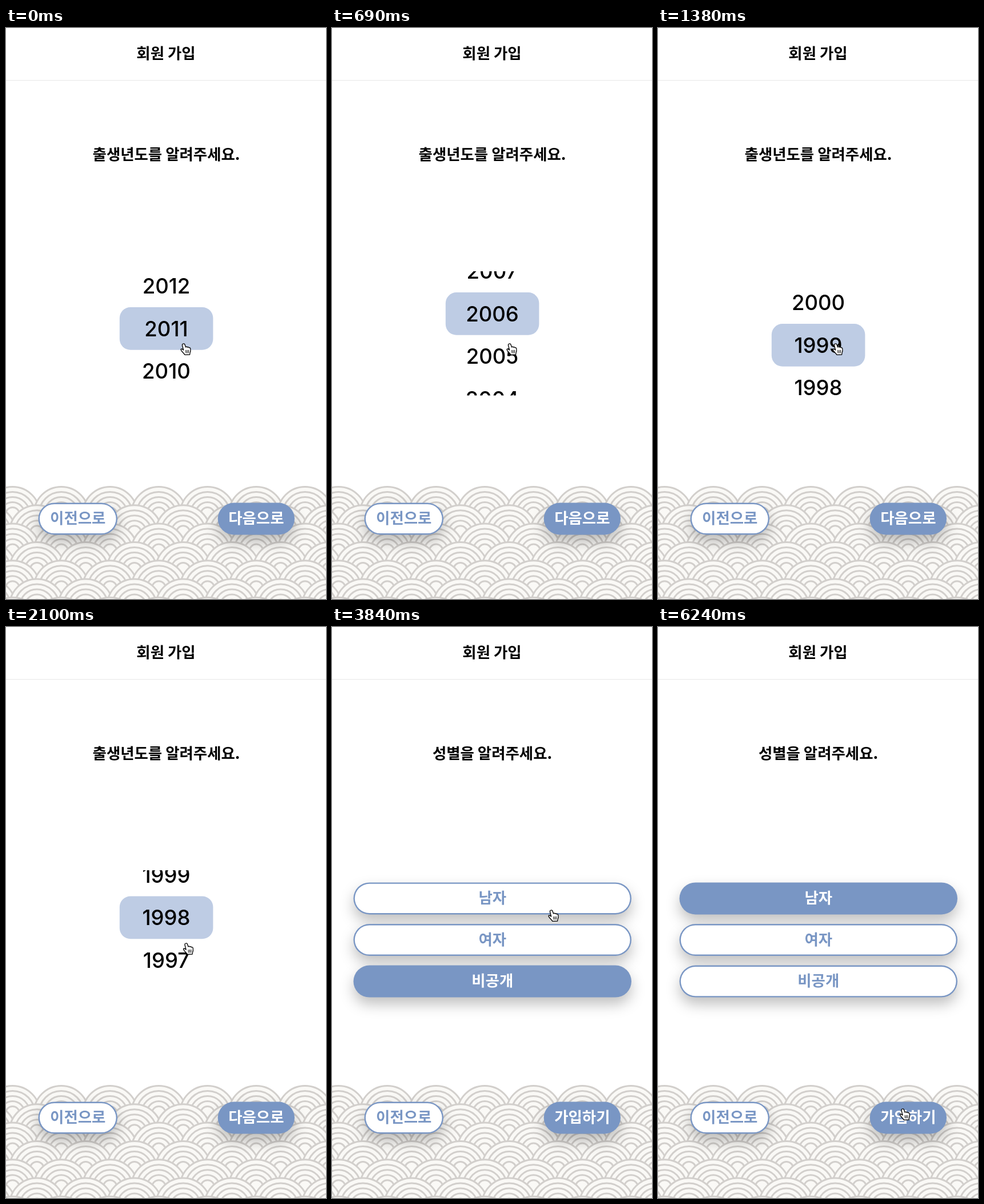
An HTML page with a canvas for the animation above (6.45 s loop, 560x1000 px).

```html
<!DOCTYPE html>
<html lang="ko">
<head>
<meta charset="utf-8">
<title>회원 가입</title>
<style>
  html, body { margin: 0; width: 100%; height: 100%; overflow: hidden; background: #fff; }
  canvas { display: block; width: 560px; height: 1000px; }
</style>
</head>
<body>
<canvas id="stage" width="560" height="1000"></canvas>
<script>
const W = 560, H = 1000, LOOP = 6450, STEP = 30;
const BLUE = '#7996c4', PALE = '#becce4';
const KOREAN = 'bold 26.45px "Noto Sans CJK KR", "Noto Sans KR", "Noto Sans CJK", sans-serif';
const DIGITS = '450 36.5px Inter, sans-serif';
const ROW = 74.67, FIRST_YEAR = 2012, LIST_TOP = 426, LIST_BOTTOM = 643.5;
const FORM_AT = 2760, PICK_AT = 4320;

const ctx = document.getElementById('stage').getContext('2d');

// [time, value...]
const SCROLL = [[-60, -12], [0, 0], [690, 399.3], [1380, 867], [1860, 988.2]];
const POINTER = [
  [0, 305, 552], [2070, 305, 552], [2100, 309.5, 553], [2490, 474, 846],
  [2640, 466, 848], [2970, 466, 848], [3600, 380, 506], [3840, 378, 495],
  [4290, 376, 480], [4800, 376, 480], [4830, 376.5, 480.5], [5100, 385, 488],
  [5220, 385, 488], [5790, 422.5, 843]
];

// Monotone cubic through the keys: smooth, without overshoot
function track(keys, t, k = 1) {
  const last = keys.length - 1;
  if (t >= keys[last][0]) return keys[last][k];
  let i = 0;
  while (t >= keys[i + 1][0]) i++;
  const slope = n => (keys[n + 1][k] - keys[n][k]) / (keys[n + 1][0] - keys[n][0]);
  const tangent = n => {
    if (n === 0 || n === last) return 0;
    const a = slope(n - 1), b = slope(n);
    return a * b <= 0 ? 0 : 2 * a * b / (a + b);
  };
  const a = keys[i], b = keys[i + 1], d = b[0] - a[0], u = (t - a[0]) / d;
  const ease = u * u * (3 - 2 * u);
  return a[k] + (b[k] - a[k]) * ease
    + d * u * (1 - u) * ((1 - u) * tangent(i) - u * tangent(i + 1));
}

function text(str, x, y, color, font = KOREAN) {
  ctx.font = font;
  ctx.fillStyle = color;
  ctx.textAlign = 'center';
  ctx.fillText(str, x, y);
}

function roundRect(x, y, w, h, r) {
  ctx.beginPath();
  ctx.roundRect(x, y, w, h, r);
}

function button(label, x, y, w, filled) {
  const h = 56;
  ctx.save();
  ctx.shadowColor = 'rgba(0,0,0,0.25)';
  ctx.shadowBlur = 24;
  ctx.shadowOffsetY = 12;
  ctx.fillStyle = BLUE;
  roundRect(x, y, w, h, h / 2);
  ctx.fill();
  ctx.restore();
  if (!filled) {
    const b = 2.4;
    ctx.fillStyle = '#fff';
    roundRect(x + b, y + b, w - 2 * b, h - 2 * b, h / 2 - b);
    ctx.fill();
  }
  text(label, x + w / 2, y + 36.7, filled ? '#fff' : BLUE);
}

function waves() {
  const period = 85.3, radius = 48, gap = 9, rise = 32.3;
  ctx.lineWidth = 3;
  ctx.strokeStyle = '#d2cfcc';
  ctx.fillStyle = '#faf9f6';
  for (let row = 0; row < 7; row++) {
    const cy = 803.5 + radius + row * rise;
    const start = 11.5 - (row % 2 ? period / 2 : period);
    for (let cx = start; cx < W + period; cx += period) {
      for (let r = radius; r > gap; r -= gap) {
        ctx.beginPath();
        ctx.arc(cx, cy, r, 0, 2 * Math.PI);
        if (r === radius) ctx.fill();
        ctx.stroke();
      }
    }
  }
}

function yearList(t) {
  const top = 451.7 - track(SCROLL, t);
  const chosen = Math.round(((LIST_TOP + LIST_BOTTOM) / 2 - top) / ROW);
  ctx.save();
  ctx.beginPath();
  ctx.rect(0, LIST_TOP, W, LIST_BOTTOM - LIST_TOP);
  ctx.clip();
  ctx.fillStyle = PALE;
  roundRect(198.8, top + chosen * ROW - ROW / 2, 163.6, ROW, 19);
  ctx.fill();
  for (let i = Math.max(0, chosen - 2); i <= chosen + 2; i++) {
    text(String(FIRST_YEAR - i), 280.5, top + i * ROW + 13.3, '#000', DIGITS);
  }
  ctx.restore();
}

function genderForm(t) {
  const chosen = t < PICK_AT ? 2 : 0;
  ['남자', '여자', '비공개'].forEach((label, i) =>
    button(label, 37.5, 447.4 + i * 72.6, 486.5, i === chosen));
}

const hand = new Path2D(`M5 1 C6.5 .4 7.6 1.3 8 2.5 L9.5 7 C10.2 5.8 11.9 5.8 12.4 7.2
  C13.4 6.3 14.8 6.7 15.2 8 C16.4 7.4 17.6 8 17.8 9.5 C18.2 12 18 14.5 17 17 L16.6 20
  L8 20.4 C7 18.5 4.5 16.5 2.6 14 C.3 11.2 .8 10 2.2 10 C3.4 10 4.5 11 5.6 12
  L3.5 4 C3.2 2.4 3.8 1.4 5 1 Z`);
const creases = new Path2D('M9.6 12.5 L10 17 M12 12.3 L12.2 17 M14.4 12.2 L14.4 17');

function pointer(t) {
  ctx.save();
  ctx.translate(track(POINTER, t, 1), track(POINTER, t, 2));
  ctx.lineJoin = ctx.lineCap = 'round';
  ctx.fillStyle = '#fff';
  ctx.strokeStyle = '#000';
  ctx.lineWidth = 1.3;
  ctx.fill(hand);
  ctx.stroke(hand);
  ctx.lineWidth = 1;
  ctx.stroke(creases);
  ctx.restore();
}

function draw(t) {
  const form = t >= FORM_AT;
  ctx.fillStyle = '#fff';
  ctx.fillRect(0, 0, W, H);
  text('회원 가입', 280, 54.3, '#000');
  ctx.fillStyle = '#ededed';
  ctx.fillRect(0, 91, W, 1.5);
  text(form ? '성별을 알려주세요.' : '출생년도를 알려주세요.', 280.5, 230.6, '#000');
  waves();
  if (form) genderForm(t); else yearList(t);
  button('이전으로', 56.5, 831.5, 138.5, false);
  button(form ? '가입하기' : '다음으로', 370.7, 831.5, 134.3, true);
  pointer(t);
}

const begin = performance.now();
function frame() {
  const t = Math.max(0, performance.now() - begin) % LOOP;
  draw(Math.floor(t / STEP) * STEP);
  requestAnimationFrame(frame);
}
frame();
</script>
</body>
</html>
```
